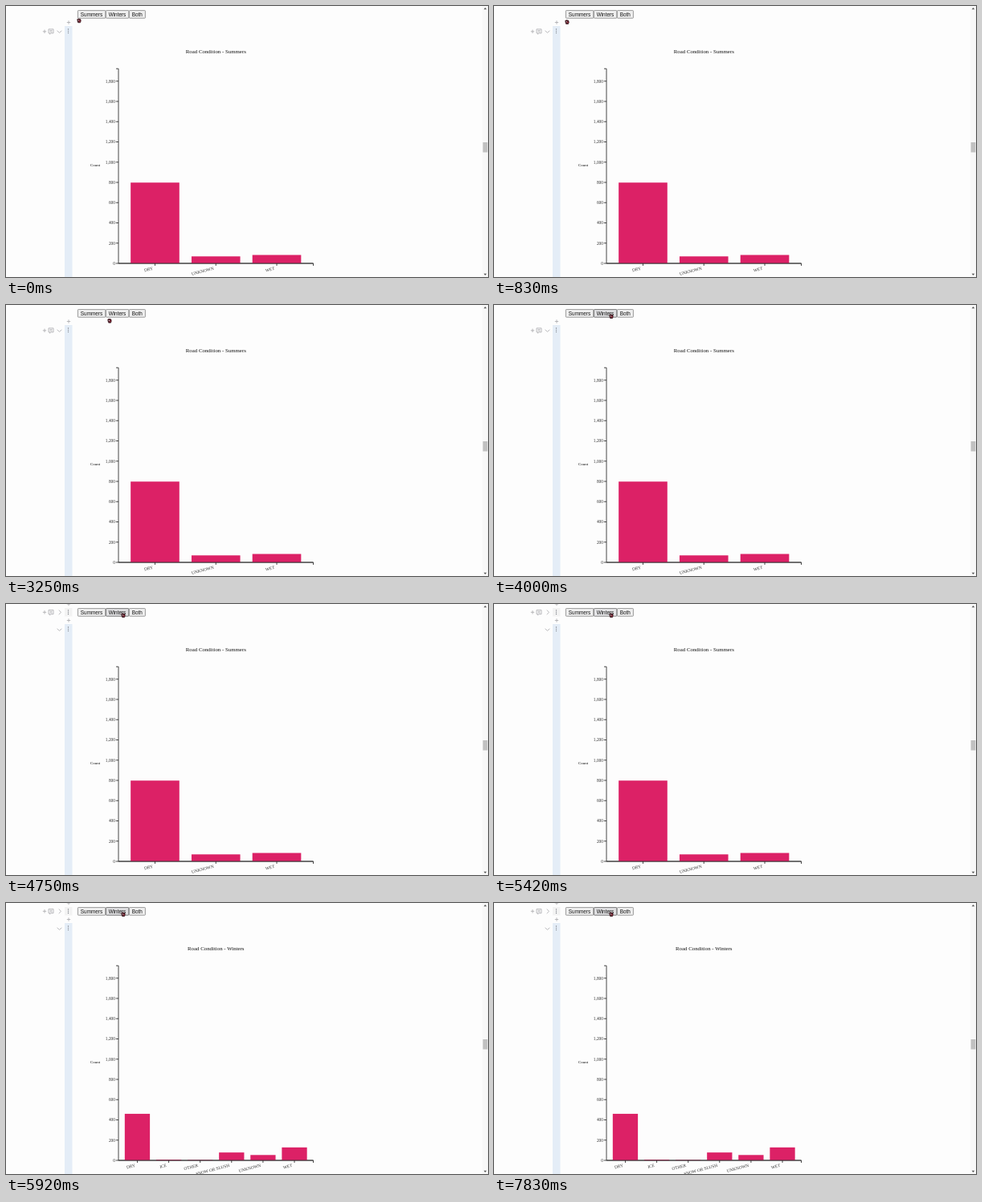
These frames come from a looping animation (600x338 px, 8 s). An HTML page:

```html
<!DOCTYPE html>
<html lang="en">
<head>
<meta charset="utf-8">
<title>Road condition chart</title>
<style>
  html, body { margin: 0; width: 100%; height: 100%; overflow: hidden; background: #fdfdfd; }
  svg { display: block; width: 600px; height: 338px; }
  text { font-family: "Liberation Serif", Times, serif; fill: #111; }
  .button rect { fill: #efefef; stroke: #858585; stroke-width: .8; }
  .button text { font: 6.4px "Liberation Sans", Arial, sans-serif; text-anchor: middle; }
  .button.hover rect { fill: #dfdfe1; stroke: #5c5c5c; }
  .button.pressed rect { fill: #e6e6e8; stroke: #6a6a6a; }
  .tick { font-size: 5.4px; text-anchor: end; fill: #333; }
  .title { font-size: 6.85px; text-anchor: middle; }
  .axis { fill: none; stroke: #333; stroke-width: .9; }
  .icon { fill: none; stroke: #a9a9ad; stroke-width: .8; }
</style>
</head>
<body>
<svg viewBox="0 0 600 338">
  <defs>
    <path id="plus" class="icon" d="M-2.2 0h4.4M0-2.2v4.4"/>
    <path id="comment" class="icon" d="M-3-2.6h6v5h-3l-1.5 1.2v-1.2h-1.5zM-1.5-.9h3M-1.5.7h3"/>
    <path id="down" class="icon" d="M-2.8-1.3 0 1.5 2.8-1.3"/>
    <path id="right" class="icon" d="M-1.3-2.8 1.5 0-1.3 2.8"/>
    <g id="dots" fill="#777b82"><circle cy="-2.3" r=".65"/><circle r=".65"/><circle cy="2.3" r=".65"/></g>
  </defs>

  <rect x="73" y="25" width="9.5" height="313" fill="#e4edf7"/>
  <rect id="running" x="82.5" y="25" width="1.5" height="313" fill="#7f9ab8"/>
  <use href="#plus" x="78" y="20.5"/>
  <use href="#down" x="66.5" y="32"/>
  <use href="#dots" x="77.5" y="31.3"/>
  <g id="lowerCell">
    <use href="#plus" x="48" y="31.8"/>
    <use href="#comment" x="56" y="31.5"/>
  </g>
  <g id="upperCell">
    <rect x="73" y="5" width="9.5" height="10.5" fill="#f3f3f3"/>
    <use href="#plus" x="78" y="0"/>
    <use href="#plus" x="48" y="10.3"/>
    <use href="#comment" x="56" y="10.2"/>
    <use href="#right" x="67" y="10.3"/>
    <use href="#dots" x="77.5" y="10.2"/>
  </g>

  <g class="button"><rect x="89.4" y="5.6" width="34.4" height="9.6" rx=".7"/><text x="106.5" y="12.6">Summers</text></g>
  <g class="button" id="winters"><rect x="124.4" y="5.6" width="28.4" height="9.6" rx=".7"/><text x="138.5" y="12.6">Winters</text></g>
  <g class="button"><rect x="153.4" y="5.6" width="20" height="9.6" rx=".7"/><text x="163.3" y="12.6">Both</text></g>

  <g id="axes"><text x="111" y="199.6" font-size="5" text-anchor="middle">Count</text></g>
  <g id="summerChart"></g>
  <g id="winterChart"></g>

  <rect x="593" width="7" height="338" fill="#f8f8f8"/>
  <rect x="593.6" y="170" width="5.8" height="12.5" fill="#c1c1c1"/>
  <path d="M594.7 4.2 596.5 2l1.8 2.2zM594.7 333.8l1.8 2.2 1.8-2.2z" fill="#555"/>

  <g id="cursor">
    <path d="M-2.3-1.9-.8-2.5 1.8-2 2.3.2 1.5 2.4h-2.8L-2 .8z" fill="#4d1823" stroke="#2c1518" stroke-width=".5"/>
    <path d="M-1.2-.9h1.1v1h-1.1z" fill="#eee"/>
    <path d="M.2-.3h1.2v1.2H.2z" fill="#c23a4b"/>
  </g>
</svg>
<script>
const LOOP = 8000, LEFT = 140, RIGHT = 382.5, BASE = 321, STEP = 25.25;
const $ = id => document.getElementById(id);

function add(parent, tag, attrs, text = '') {
  const node = document.createElementNS('http://www.w3.org/2000/svg', tag);
  for (const name in attrs) node.setAttribute(name, attrs[name]);
  node.textContent = text;
  parent.append(node);
}

function drawAxes() {
  const g = $('axes');
  add(g, 'path', { class: 'axis', d: `M137 78.2H${LEFT}V${BASE}H${RIGHT}v3` });
  for (let i = 0; i < 10; i++) {
    const y = BASE - i * STEP;
    add(g, 'path', { class: 'axis', d: `M136.8 ${y}H${LEFT}` });
    add(g, 'text', { class: 'tick', x: 136, y: y + 1.8 }, (i * 200).toLocaleString('en-US'));
  }
}

function drawChart(g, season, counts) {
  const entries = Object.entries(counts);
  const step = (RIGHT - LEFT) / (entries.length + .2), band = step * .8;
  add(g, 'text', { class: 'title', x: 261.3, y: 59 }, 'Road Condition - ' + season);
  entries.forEach(([name, count], i) => {
    const x = LEFT + step * (i + .2), mid = x + band / 2, height = count / 200 * STEP;
    add(g, 'rect', { x, y: BASE - height, width: band, height, fill: '#dc2166' });
    add(g, 'path', { class: 'axis', d: `M${mid} ${BASE}v3` });
    add(g, 'text', { class: 'tick', transform: `translate(${mid - 2.3} 328.7) rotate(-15)` }, name);
  });
  add(g, 'path', { class: 'axis', d: `M${LEFT} ${BASE}H${RIGHT}` });
}

drawAxes();
drawChart($('summerChart'), 'Summers', { DRY: 798, UNKNOWN: 69, WET: 83 });
drawChart($('winterChart'), 'Winters',
  { DRY: 460, ICE: 7, OTHER: 4, 'SNOW OR SLUSH': 78, UNKNOWN: 53, WET: 128 });

const stops = [[0, 91, 18.4], [250, 91, 20.1], [2580, 91, 20.4], [2830, 109, 20], [3080, 115, 20],
  [3250, 129, 19.8], [3750, 137, 18], [4000, 146, 14.3]];

const show = (id, on) => $(id).style.display = on ? '' : 'none';

function frame(now) {
  const t = now % LOOP;
  const [, x, y] = stops.findLast(stop => stop[0] <= t);
  $('cursor').setAttribute('transform', `translate(${x} ${y})`);
  const pressed = t >= 5420 && t < 5670;
  $('winters').setAttribute('class', 'button' + (pressed ? ' pressed' : t >= 4000 ? ' hover' : ''));
  show('lowerCell', t < 4250);
  show('upperCell', t >= 4250);
  show('summerChart', t < 5670);
  show('winterChart', t >= 5670);
  show('running', t >= 5670 && t < 5920);
  requestAnimationFrame(frame);
}
frame(0);
</script>
</body>
</html>
```
